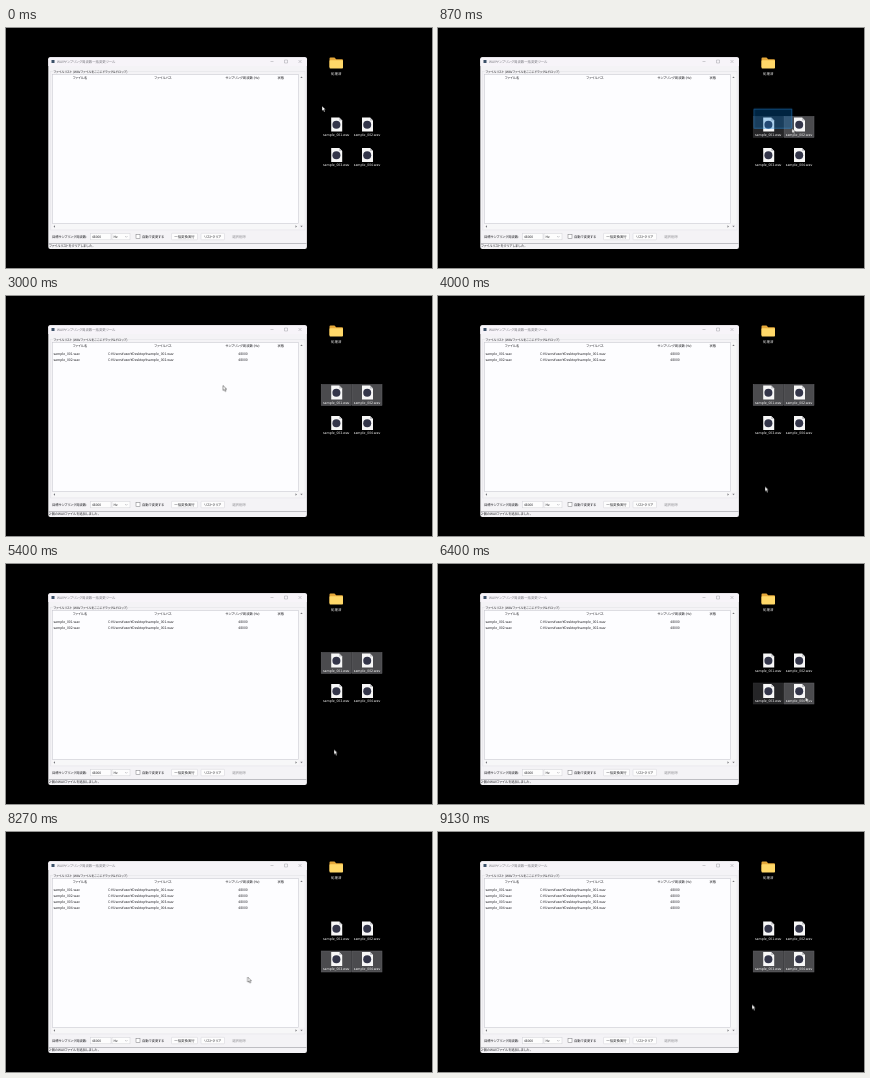
Recreate the animation shown at these times as an HTML page. Size 426x240 px, loop 9190 ms.

```html
<!DOCTYPE html>
<html lang="ja">
<head>
<meta charset="utf-8">
<title>WAVサンプリング周波数一括変更ツール</title>
<style>
html, body { margin: 0; width: 100%; height: 100%; overflow: hidden; background: #000; }
svg { display: block; width: 100%; height: 100%; }
text {
  font: 3.3px "Noto Sans CJK JP", "Noto Sans", sans-serif;
  font-feature-settings: "palt";
  text-rendering: geometricPrecision;
  fill: #1c1c20;
}
.mid { text-anchor: middle; }
.title { font-size: 3.4px; fill: #77777e; }
.group { font-size: 3.15px; }
.name { font-size: 3.4px; }
.dim { fill: #8c8c90; }
.label { text-anchor: middle; fill: #fff; font-size: 3.4px; }
.box { fill: #fdfdfd; stroke: #d2d2d8; stroke-width: .5; }
.line { fill: none; stroke: #a0a0a6; stroke-width: .5; }
.cell { fill: #4b4b4e; stroke: #646468; stroke-width: .5; }

.anim { animation: 9.19s step-end infinite; }
#cursor { animation: move 9.19s ease-in-out infinite; }
.badge { animation-name: drag; }
.picked0 { animation-name: pick0; }
.picked1 { animation-name: pick1; }
.batch0 { animation-name: drop0; }
.batch1 { animation-name: drop1; }
.cleared { animation-name: cleared; }
.band { fill: #0078d74d; stroke: #2a8fe0; stroke-width: .5; vector-effect: non-scaling-stroke; }
#band0 { animation: band0 9.19s ease-in-out infinite; }
#band1 { animation: band1 9.19s ease-in-out infinite; }

@keyframes move {
  0% { transform: translate(316px, 78px); }
  4.4% { transform: translate(316px, 81px); }
  13.1% { transform: translate(375px, 111px); }
  17.4%, 19.6% { transform: translate(360px, 94.5px); }
  29.4%, 33.2% { transform: translate(217px, 89.5px); }
  42.4%, 50% { transform: translate(327px, 190.5px); }
  54%, 59% { transform: translate(328px, 185.5px); }
  62.6% { transform: translate(316px, 115px); }
  68% { transform: translate(375px, 141px); }
  71.3%, 72.9% { transform: translate(360px, 125px); }
  80%, 88% { transform: translate(233.5px, 142px); }
  97%, 100% { transform: translate(314px, 172.5px); }
}
@keyframes band0 {
  0%, 4.39% { opacity: 0; transform: translate(316px, 81px) scale(0); }
  4.4% { opacity: 1; transform: translate(316px, 81px) scale(0); }
  13.1% { opacity: 1; transform: translate(316px, 81px) scale(59, 30); }
  13.11%, 100% { opacity: 0; transform: translate(316px, 81px) scale(59, 30); }
}
@keyframes band1 {
  0%, 62.59% { opacity: 0; transform: translate(316px, 115px) scale(0); }
  62.6% { opacity: 1; transform: translate(316px, 115px) scale(0); }
  68% { opacity: 1; transform: translate(316px, 115px) scale(59, 26); }
  68.01%, 100% { opacity: 0; transform: translate(316px, 115px) scale(59, 26); }
}
@keyframes drag {
  0% { opacity: 0; } 20.5% { opacity: 1; } 31.2% { opacity: 0; }
  73.5% { opacity: 1; } 86% { opacity: 0; } 100% { opacity: 0; }
}
/* a cell stays dim until the drag begins, unless the pointer is over it */
@keyframes pick0 {
  0% { opacity: 0; } 8.8% { opacity: var(--rest); } 20.5% { opacity: 1; }
  62.6% { opacity: 0; } 100% { opacity: 0; }
}
@keyframes pick1 {
  0% { opacity: 0; } 65.3% { opacity: var(--rest); } 73.5% { opacity: 1; } 100% { opacity: 1; }
}
@keyframes drop0 { 0% { opacity: 0; } 31.2% { opacity: 1; } 100% { opacity: 1; } }
@keyframes drop1 { 0% { opacity: 0; } 86% { opacity: 1; } 100% { opacity: 1; } }
@keyframes cleared { 0% { opacity: 1; } 31.2% { opacity: 0; } 100% { opacity: 0; } }
</style>
</head>
<body>
<svg viewBox="0 0 426 240">
  <defs>
    <g id="wav">
      <path d="M-5-7H3L6-4V7H-5Z" fill="#f7f7f7"/>
      <path d="M3-7V-4H6Z" fill="#c4c4c8"/>
      <circle cx=".2" cy=".2" r="4" fill="#34364a"/>
    </g>
  </defs>

  <!-- window frame -->
  <rect x="42.3" y="29.3" width="258.6" height="191.6" rx="2" fill="#f4f3f6"/>
  <path d="M42.3 38V31.3a2 2 0 0 1 2-2H298.9a2 2 0 0 1 2 2V38Z" fill="#f7f4f9"/>
  <rect x="45.5" y="32" width="3" height="3" fill="#3b5068"/>
  <text class="title" x="51" y="35">WAVサンプリング周波数一括変更ツール</text>
  <path class="line" d="M264.5 33.5h3M278.500 32h3v3h-3zM292.500 32l3 3m0-3l-3 3"/>

  <!-- file list -->
  <rect x="44.5" y="43.5" width="254.5" height="158.5" fill="none" stroke="#e2e2e6" stroke-width=".5"/>
  <rect x="47" y="41" width="75" height="5" fill="#f4f3f6"/>
  <text class="group" x="47.5" y="44.7">ファイルリスト (WAVファイルをここにドラッグ＆ドロップ)</text>
  <rect x="46.5" y="46.5" width="246" height="149" fill="#fdfdff" stroke="#c4c4cc" stroke-width=".5"/>
  <path d="M293 46.5h5.500v149h-5.500zM46.500 196h246v5h-246z" fill="#f7f7f8"/>
  <path d="M294.3 50l1.2-1.5 1.2 1.5zM294.3 197.7l1.2 1.5 1.2-1.5zM49 197.3l-1.5 1.2 1.5 1.2zM289.5 197.3l1.5 1.2-1.5 1.2z" fill="#77777c"/>
  <text class="mid" x="74" y="51.3">ファイル名</text>
  <text class="mid" x="157" y="51.3">ファイルパス</text>
  <text class="mid" x="236.5" y="51.3">サンプリング周波数 (Hz)</text>
  <text class="mid" x="274.7" y="51.3">状態</text>
  <g id="rows"></g>

  <!-- controls -->
  <text x="46" y="209.7">目標サンプリング周波数:</text>
  <rect class="box" x="84.5" y="205.3" width="20.5" height="6.5"/>
  <text x="86" y="209.7">48000</text>
  <rect class="box" x="106" y="205.3" width="18" height="6.5"/>
  <text x="107.5" y="209.7">Hz</text>
  <path class="line" d="M119 208l1.3 1.3 1.3-1.3"/>
  <rect x="130" y="206.5" width="4" height="4" fill="#fff" stroke="#77777c" stroke-width=".5"/>
  <text x="136" y="209.7">自動で変更する</text>
  <rect class="box" x="165.5" y="205.3" width="26" height="6.5" rx=".6"/>
  <text class="mid name" x="178.5" y="209.7">一括変換実行</text>
  <rect class="box" x="195" y="205.3" width="23.5" height="6.5" rx=".6"/>
  <text class="mid" x="206.7" y="209.7">リストクリア</text>
  <text class="mid name dim" x="233" y="209.7">選択削除</text>

  <!-- status bar -->
  <path d="M42.5 215.5H300.5" stroke="#9a9aa2" stroke-width=".6"/>
  <text class="anim cleared" x="43" y="219.3">ファイルリストをクリアしました。</text>
  <text class="anim batch0" x="43" y="219.3">2 個のWAVファイルを追加しました。</text>

  <!-- desktop -->
  <path d="M323.5 30.5q0-1 1-1h4l1.7 1.7h5.800q1 0 1 1V39h-13.500z" fill="#e5a83a"/>
  <rect x="323.5" y="32.3" width="13.5" height="8.3" rx=".8" fill="#ffd869"/>
  <text class="label" x="330.2" y="47.3">処理済</text>
  <g id="files"></g>
  <rect id="band0" class="band" width="1" height="1"/>
  <rect id="band1" class="band" width="1" height="1"/>

  <g id="cursor">
    <path d="M0 0V5L1.2 4 2.1 5.900 3.100 5.400 2.200 3.600H3.700Z" fill="#fff" stroke="#000" stroke-width=".4"/>
    <g class="anim badge">
      <rect x="2.3" y="5" width="3" height="3" fill="#fff" stroke="#555" stroke-width=".4"/>
      <path d="M3.8 5.6v1.8M2.9 6.5h1.8" stroke="#222" stroke-width=".4"/>
    </g>
  </g>
</svg>
<script>
const rows = document.getElementById('rows');
const files = document.getElementById('files');

for (let i = 0; i < 4; i++) {
  const name = `sample_00${i + 1}.wav`;
  const batch = Math.floor(i / 2);
  const column = i % 2;

  const y = 58.5 + i * 6.1;
  rows.innerHTML += `<g class="anim batch${batch}">
    <text class="name" x="47.5" y="${y}">${name}</text>
    <text class="name" x="102" y="${y}">C:¥Users¥user¥Desktop¥${name}</text>
    <text class="mid name" x="237" y="${y}">48000</text></g>`;

  const x = 330.2 + column * 30.8;
  const top = 88.5 + batch * 30.5;
  files.innerHTML += `<rect class="cell anim picked${batch}" style="--rest:${column ? 1 : 0.5}"
      x="${x - 15}" y="${top}" width="30" height="21"/>
    <use href="#wav" x="${x}" y="${top + 8}"/>
    <text class="label" x="${x}" y="${top + 19.4}">${name}</text>`;
}
</script>
</body>
</html>
```
